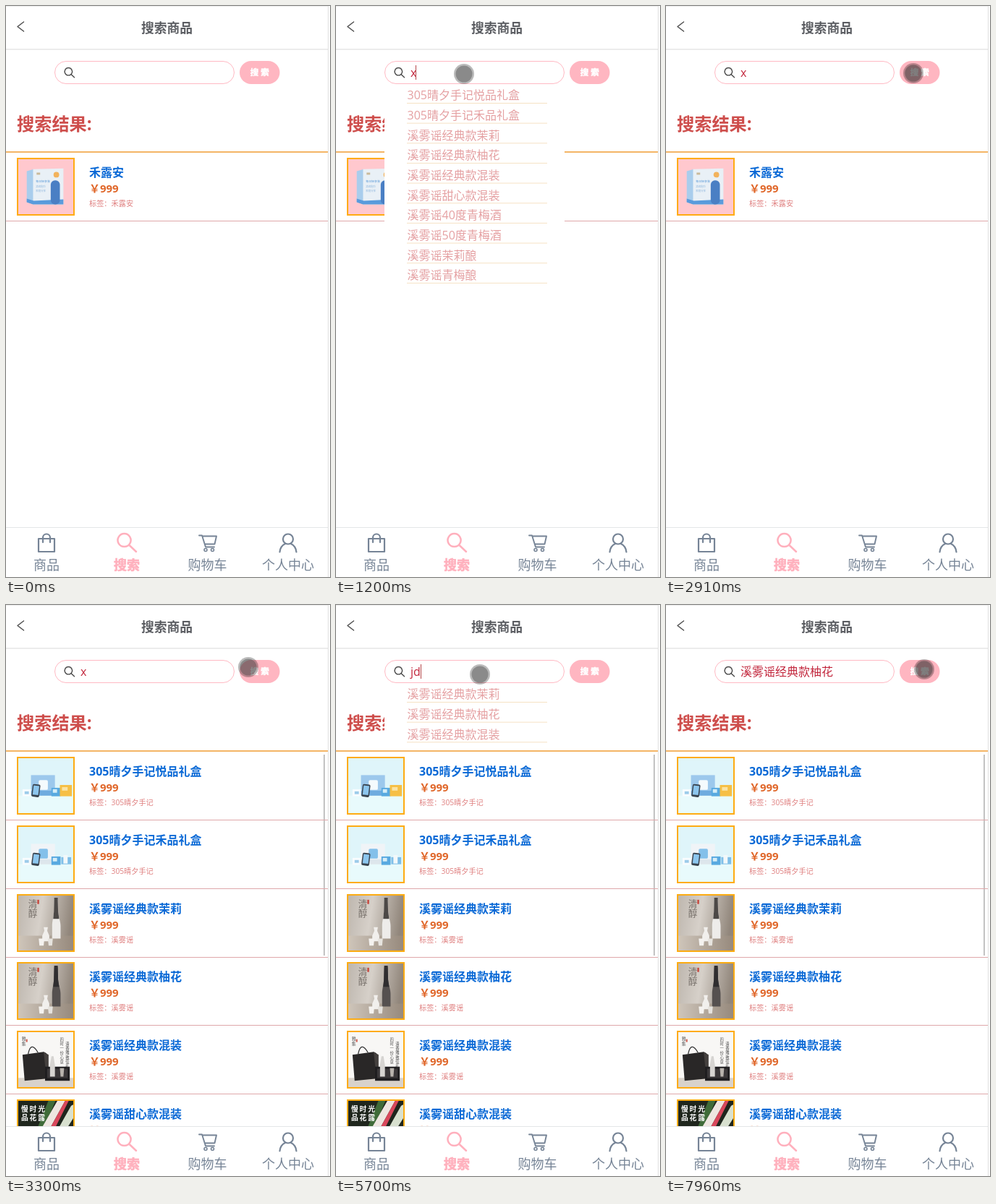
Recreate the animation shown at these times as an HTML page. Size 448 by 790 pixels, loop 8000 ms.

```html
<!DOCTYPE html>
<html lang="zh-CN">
<head>
<meta charset="utf-8">
<title>搜索商品</title>
<style>
html, body { margin: 0; width: 100%; height: 100%; overflow: hidden; background: #fff; }
svg { display: block; }
#stage {
  position: absolute; left: 0; top: 0;
  font-family: "Open Sans", "Noto Sans CJK SC", "Noto Sans CJK", sans-serif; font-size: 16px;
}
.b { font-weight: 700; }
.mid { text-anchor: middle; }
.line { fill: none; stroke-linecap: round; stroke-linejoin: round; }
.name { font-weight: 700; fill: #0a69d6; }
.price { font-weight: 700; font-size: 15px; fill: #e0672a; }
.tag { font-size: 10.2px; fill: #df7f7f; }
.option { fill: #e5a0a2; }
.typed { fill: #c2263c; }
.nav { font-size: 18px; fill: #768496; text-anchor: middle; }
.nav.on { fill: #ffb0bd; stroke: #ffb0bd; stroke-width: .6px; font-weight: 700; }
#cursor { animation: move 8s linear infinite; }
@keyframes move {
  0%, 0.875% { transform: translate(296px, 669px); animation-timing-function: ease-out; }
  7.25%, 9.125% { transform: translate(162px, 108px); }
  12%, 17.2% { transform: translate(177px, 94px); animation-timing-function: ease-in-out; }
  22%, 23.5% { transform: translate(215px, 262px); animation-timing-function: ease-in-out; }
  27.6% { transform: translate(267px, 85px); }
  30.5%, 37.25% { transform: translate(342px, 93px); }
  40.5%, 42.5% { transform: translate(335px, 86px); }
  45.5% { transform: translate(245px, 109px); animation-timing-function: ease-out; }
  48%, 83.4% { transform: translate(199px, 96px); }
  85% { transform: translate(208px, 108px); }
  88%, 89.75% { transform: translate(191px, 140px); animation-timing-function: ease-in-out; }
  97% { transform: translate(355px, 87px); }
  99.5%, 100% { transform: translate(357px, 89px); }
}
</style>
</head>
<body>
<svg id="stage" width="448" height="790" viewBox="0 0 448 790">
  <defs>
    <linearGradient id="warm" x2="1" y2="0.15">
      <stop offset="0" stop-color="#bdb6ae"/><stop offset="0.45" stop-color="#d6d0c9"/><stop offset="1" stop-color="#91867b"/>
    </linearGradient>
    <linearGradient id="wood">
      <stop offset="0" stop-color="#cfc6bb"/><stop offset="1" stop-color="#96897c"/>
    </linearGradient>
  </defs>
  <rect width="448" height="790" fill="#fff"/>
  <path d="M0 .5H446" stroke="#efefef"/>
  <path d="M0 60H445" stroke="#ececec" stroke-width="2"/>
  <path class="line" d="M24.5 22 16 28.5 24.5 35" stroke="#4a4a4a" stroke-width="1.4"/>
  <text class="b mid" x="222.5" y="37.3" font-size="17.8" fill="#5a5c61">搜索商品</text>

  <text class="b" x="15" y="171.500" font-size="24.2" fill="#ce4e4c">搜索结果:</text>
  <path d="M0 202H445" stroke="#f4b566" stroke-width="2"/>
  <g id="first"></g>
  <g id="results"><path d="M440 207V485" stroke="#c3c3c3" stroke-width="2"/></g>

  <rect y="721" width="445" height="69" fill="#fff"/>
  <path d="M0 721.5H445" stroke="#e4e6e8"/>
  <g class="line" stroke="#768496" stroke-width="2.2">
    <path d="M45 737H67V755H45ZM51 742V735.500a5 5 0 0 1 10 0V742"/>
    <path d="M267 732.500H271L276 748.500H288M271.500 733.500H291L288.500 744.500H275" stroke-width="1.9"/>
    <circle cx="276" cy="752.500" r="2" stroke-width="1.6"/><circle cx="285.500" cy="752.500" r="2" stroke-width="1.6"/>
    <circle cx="390" cy="737.500" r="7"/>
    <path d="M378.500 755.500C379 748.500 383 745.500 386 744M394 744C397 745.500 401 748.500 401.500 755.500"/>
    <path d="M170 745.500 180 755M163.500 730a9 9 0 1 0 .1 0Z" stroke="#ffb0bd" stroke-width="2.5"/>
  </g>
  <text class="nav" x="56" y="779.5">商品</text>
  <text class="nav on" x="167" y="779.5">搜索</text>
  <text class="nav" x="278.5" y="779.5">购物车</text>
  <text class="nav" x="390" y="779.5">个人中心</text>
  <path d="M445.500 0V790" stroke="#dfdfdf"/>

  <g id="menus"></g>
  <rect x="67.500" y="76.500" width="248" height="31" rx="15.500" fill="#fff" stroke="#ffb9c3"/>
  <path class="line" d="M90.500 95 94.500 98.700M86.300 85.500a5.200 5.200 0 1 0 .1 0Z" stroke="#4a4a4a" stroke-width="1.4"/>
  <rect x="323" y="76" width="55.500" height="32" rx="16" fill="#ffb6c1"/>
  <text class="b mid" x="350.800" y="96.300" font-size="11.500" fill="#fff" stroke="#fff" stroke-width=".5">搜 索</text>
  <g id="entry"></g>
  <g id="pointer">
    <g id="cursor">
      <circle r="14" fill="#000" opacity=".27"/>
      <circle r="11.500" fill="#404040" opacity=".4"/>
      <circle id="press" r="12.500" fill="#222" opacity=".1"/>
    </g>
  </g>
</svg>
<script>
const LOOP = 8000;
const $ = id => document.getElementById(id);
const css = document.createElement('style');
const add = (id, markup) => $(id).insertAdjacentHTML('beforeend', markup);

// Show an element only within the given [start, end] spans in ms.
function during(id, ...spans) {
  const at = (t, v) => `${t / LOOP * 100}%{visibility:${v}}`;
  const first = spans[0][0] > 0 ? at(0, 'hidden') : '';
  const steps = spans.map(([a, b]) => at(a, 'visible') + at(b, b < LOOP ? 'hidden' : 'visible')).join('');
  css.textContent += `@keyframes k-${id}{${first}${steps}}#${id}{visibility:hidden;animation:k-${id} 8s step-end infinite}`;
}

const A = '305晴夕手记', B = '溪雾谣';
const gift = [A + '悦品礼盒', A + '禾品礼盒'];
const classic = ['茉莉', '柚花', '混装'].map(s => B + '经典款' + s);
const sweet = B + '甜心款混装';
const wine = ['40度青梅酒', '50度青梅酒'].map(s => B + s);
const brew = ['茉莉酿', '青梅酿'].map(s => B + s);
const solo = '禾露安';

const rect = (x, y, w, h, fill, more = '') =>
  `<rect x="${x}" y="${y}" width="${w}" height="${h}" fill="${fill}" ${more}/>`;
const shape = (d, fill) => `<path d="${d}" fill="${fill}"/>`;
const tiny = (x, y, s, size, fill) => `<text x="${x}" y="${y}" font-size="${size}" fill="${fill}">${s}</text>`;
const column = (x, y, s, size, fill) =>
  [...s].map((c, i) => tiny(x, y + i * (size + 1), c, size, fill)).join('');

const boxPic = () => rect(0, 0, 80, 80, '#ffc8ce')
  + shape('M13 18 23 15V65L13 62Z', '#a9cdec') + shape('M22 15 65 14V65L22 65Z', '#e9f0f6')
  + shape('M13 57 23 60 65 58V65H22L13 62Z', '#5a9bdc')
  + rect(27, 20, 5, 3, '#c9b99a')
  + tiny(26, 34, '每日轻享装', 4, '#5d9bd8') + tiny(26, 41, '清润配方', 3.5, '#8ab4dc') + tiny(26, 47, '家庭分享', 3.5, '#8ab4dc')
  + '<circle cx="55" cy="23" r="4" fill="#f2b25c"/>'
  + rect(47, 31, 13, 34, '#4a7fc4', 'rx="6"');

const giftPic = (lid, front, mark, extra) => rect(0, 0, 80, 80, '#dff5fa')
  + rect(0, 54, 80, 26, '#e8fafc')
  + rect(19, 25, 34, 29, lid) + rect(19, 47, 34, 7, front)
  + rect(30, 32, 13, 14, mark, 'rx="2"')
  + rect(7, 45, 12, 10, '#f8fcfe') + rect(10, 48, 6, 4, '#9ccbea')
  + `<g transform="rotate(7 26 47)">${rect(20.5, 38, 11, 18, '#39434e', 'rx="2"')}${rect(22, 40, 8, 13, '#8cc6ee')}</g>`
  + rect(48, 43, 13, 12, '#58a9e0') + rect(50, 45, 6, 5, '#d5edf8') + extra;

const winePic = (top, body) => rect(0, 0, 80, 80, 'url(#warm)')
  + rect(0, 58, 80, 22, 'url(#wood)')
  + column(15, 17, '清醇', 13, '#77706a') + rect(28, 7, 2.5, 6, '#c5453c')
  + shape('M52 6H57L57.500 24C58 32 61 37 61 44V62H49V44C49 37 51 32 51.500 24Z', body)
  + shape('M52 4H57L57.500 24 59 34H50.500L51.500 24Z', top)
  + shape('M37 46H43L42 51 45 58V66H35V58L38 51Z', '#f1efec')
  + shape('M30 62H38L37 72H31Z', '#f4f2ef') + shape('M43 62H50L49 72H44Z', '#e6e3de');

const bagPic = () => rect(0, 0, 80, 80, '#f8f7f5') + rect(0, 66, 80, 14, '#d8d2cb')
  + shape('M7 33 37 29 41 31V67L10 70Z', '#292727') + shape('M37 29 44 33V65L41 67Z', '#44403e')
  + '<path d="M15 32Q19 13 29 30" fill="none" stroke="#333" stroke-width="1.300"/>'
  + rect(39, 50, 35, 20, '#1f1e20') + rect(42, 53, 29, 13, '#3a3739')
  + shape('M48 35H51L53 48V64H46V48Z', '#d6d4d1') + shape('M60 52H66L65 64H61Z', '#b8b3ad')
  + column(68, 19, '清香雅致佳礼', 5.5, '#444') + column(60, 13, '四时一份心意', 5.5, '#555')
  + column(6, 12, '雅集', 6, '#555') + rect(12, 11, 2, 4, '#cc5548');

const nightPic = () => rect(0, 0, 80, 80, '#1f261d')
  + shape('M44 0H54L38 40H28Z', '#3f6b38') + shape('M57 0H68L46 40H34Z', '#eee6e0')
  + shape('M68 0H73L53 40H46Z', '#d9485c') + shape('M76 8 80 6V24L70 40H58Z', '#d8e0cf')
  + `<g font-weight="700" letter-spacing="2">${tiny(5, 16, '慢时光', 10, '#fff')}${tiny(5, 29, '品花露', 10, '#fff')}</g>`;

function row(i, name, tag, art) {
  const y = Math.round(94.8 * i);
  return `<svg x="16" y="${211 + y}" width="78" height="78" viewBox="0 0 80 80">${art}</svg>`
    + `<rect x="16" y="${211 + y}" width="78" height="78" fill="none" stroke="#ffab12" stroke-width="2"/>`
    + `<text class="name" x="115" y="${235.5 + y}">${name}</text>`
    + `<text class="price" x="115" y="${257.5 + y}">￥999</text>`
    + `<text class="tag" x="115" y="${277 + y}">标签：${tag}</text>`
    + `<path d="M0 ${297.5 + y}H445" stroke="#dfa8aa"/>`;
}

add('first', row(0, solo, solo, boxPic()));
add('results', [
  [gift[0], A, giftPic('#9cc8ec', '#6fabdf', '#f4fafd', rect(60, 39, 17, 16, '#f6bf45') + rect(63, 42, 8, 5, '#fbe3a3'))],
  [gift[1], A, giftPic('#f0f4f7', '#dde6ec', '#84c0ea', rect(62, 44, 14, 10, '#7fbfe8') + rect(65, 41, 6, 12, '#f3f8fa'))],
  [classic[0], B, winePic('#4c4846', '#eeecea')],
  [classic[1], B, winePic('#2f2d2f', '#55504f')],
  [classic[2], B, bagPic()],
  [sweet, B, nightPic()]
].map((r, i) => row(i, ...r)).join(''));

function menu(id, items) {
  const lines = items.map((s, i) => {
    const y = 27.65 * i;
    return `<text class="option" x="98.500" y="${129.3 + y}">${s}</text>`
      + `<path d="M98 ${134.5 + y}H292" stroke="#f6e2c4"/>`;
  });
  add('menus', `<g id="${id}">${rect(67, 107, 249, 2.5 + 27.65 * items.length, '#fff')}${lines.join('')}</g>`);
}
menu('menu-x', [...gift, ...classic, sweet, ...wine, ...brew]);
menu('menu-j', [solo, ...gift, ...classic, sweet, ...wine]);
menu('menu-jd', classic);

const typed = (id, s) => add('entry', `<text id="${id}" class="typed" x="103" y="98">${s}</text>`);
const caret = (id, x) => add('entry', rect(x, 82, 1, 20, '#b5474a', `id="${id}"`));
typed('t-x', 'x');
typed('t-j', 'j');
typed('t-jd', 'jd');
typed('t-full', classic[1]);
caret('c-0', 103);
caret('c-x', 110);
caret('c-j', 107);
caret('c-jd', 117);

during('first', [0, 2980]);
during('results', [2980, LOOP]);
during('pointer', [70, LOOP]);
during('press', [2750, 2980], [3690, 3770], [7040, 7180], [7900, LOOP]);
during('menu-x', [1200, 2910]);
during('menu-j', [5390, 5700]);
during('menu-jd', [5700, 7180]);
during('t-x', [1200, 4860]);
during('t-j', [5390, 5700]);
during('t-jd', [5700, 7180]);
during('t-full', [7180, LOOP]);
during('c-0', [890, 1200], [4860, 5390]);
during('c-x', [1200, 1660], [2180, 2670], [3650, 4160], [4700, 4860]);
during('c-j', [5390, 5700]);
during('c-jd', [5700, 6160], [6710, 7180]);
document.head.append(css);
</script>
</body>
</html>
```
